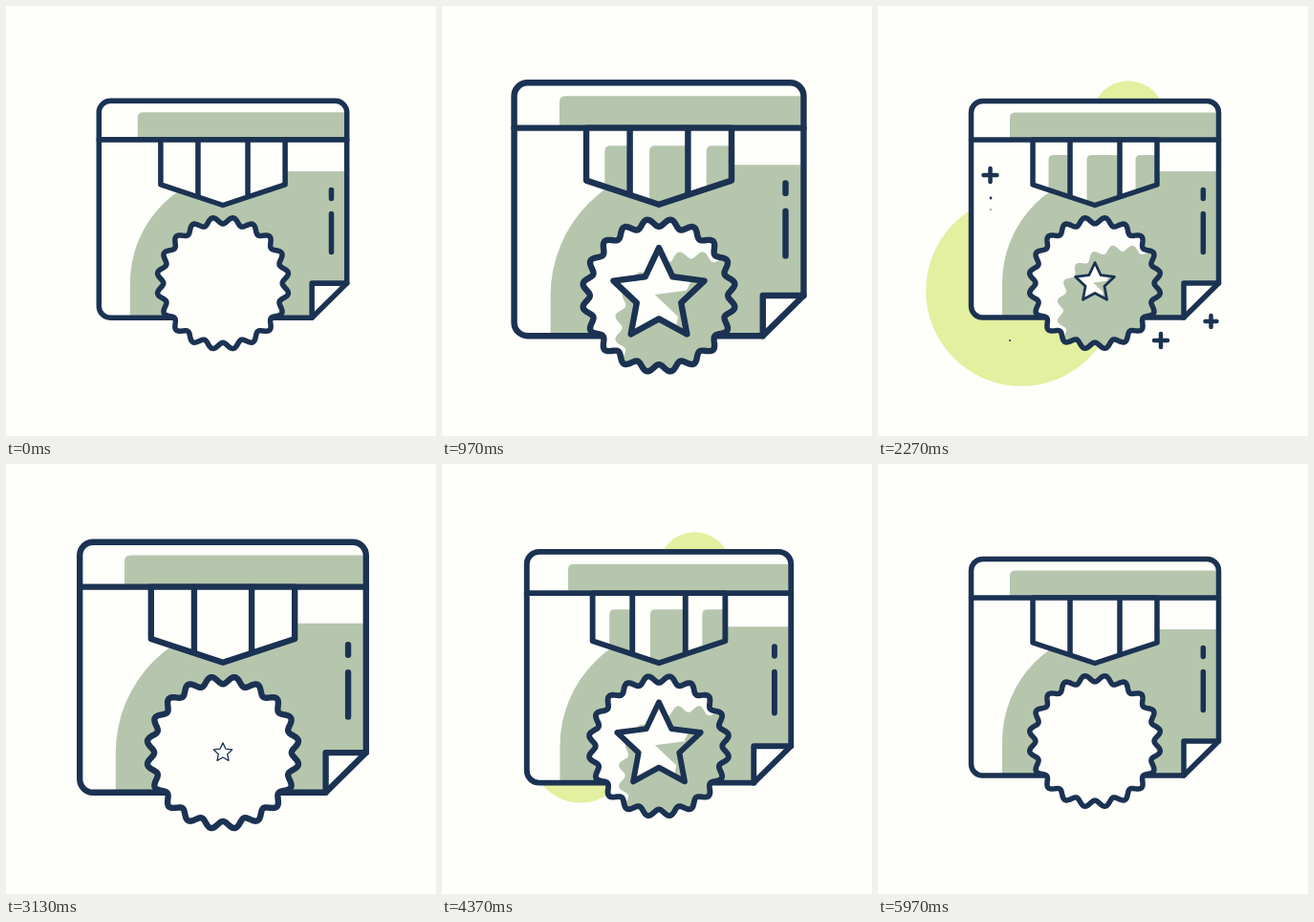
Animation, 450 px wide and 450 px high, one loop 6.01 s. Source, as an HTML page:

```html
<!DOCTYPE html>
<html lang="en">
<head>
<meta charset="utf-8">
<title>Award badge</title>
<style>
  html, body { margin: 0; width: 100%; height: 100%; overflow: hidden; background: #fefefa; }
  svg { display: block; width: 100vw; height: 100vh; }
  .line { fill: none; stroke: #1b3252; stroke-width: 5.5; stroke-linecap: round; stroke-linejoin: round; }
  .paper { fill: #fefefa; }
  .shade { fill: #b5c6ad; }
  .glow { fill: #e2f0a0; }
  .ink { fill: #1b3252; }
  .spark { stroke-width: 4.5; }
</style>
</head>
<body>
<svg viewBox="0 0 450 450">
  <defs>
    <path id="badgeShape"/>
    <path id="starShape"/>
    <path id="pageShape" d="M320 326H109.500A12 12 0 0 1 97.500 314V111.500A12 12 0 0 1 109.500 99.500H344.500A12 12 0 0 1 356.500 111.500V290Z"/>
    <path id="ribbonShape" d="M162 140V187L227 208.500L292 187V140Z"/>
    <clipPath id="badgeClip"><use href="#badgeShape"/></clipPath>
    <clipPath id="starClip"><use href="#starShape"/></clipPath>
    <clipPath id="ribbonClip"><use href="#ribbonShape"/></clipPath>
  </defs>
  <g id="scene">
    <circle id="glowRight" class="glow" cx="317" cy="226"/>
    <circle id="glowTop" class="glow" cx="262" cy="116"/>
    <circle id="glowLeft" class="glow" cx="150" cy="298"/>

    <use href="#pageShape" class="paper"/>
    <path class="shade" d="M138 140V117Q138 111.500 143.500 111.500H354V140Z"/>
    <path class="shade" d="M130 324V290A117 117 0 0 1 247 173H354V290L320 324Z"/>
    <path class="paper" d="M320 326V290H356.500Z"/>
    <use href="#pageShape" class="line"/>
    <path class="line" d="M320 326V290H356.500M97.500 140H356.500"/>
    <path id="dashes" class="line" d="M340.300 192.500V201.500M340.300 217.500V257.500"/>
    <g id="dots" class="ink">
      <circle cx="287" cy="119.700"/><circle cx="311.500" cy="119.700"/><circle cx="336" cy="119.700"/>
    </g>

    <g id="medal">
      <use href="#ribbonShape" class="paper"/>
      <path id="panels" class="shade" clip-path="url(#ribbonClip)"/>
      <use href="#ribbonShape" class="line"/>
      <path class="line" d="M201 140V199M253 140V199"/>
      <g id="badge">
        <use href="#badgeShape" class="paper"/>
        <g clip-path="url(#badgeClip)"><use id="badgeShade" href="#badgeShape" class="shade"/></g>
        <use href="#badgeShape" class="line"/>
        <g id="star">
          <use href="#starShape" class="paper"/>
          <g clip-path="url(#starClip)"><use id="starShade" href="#starShape" class="shade"/></g>
          <use href="#starShape" class="line"/>
        </g>
      </g>
    </g>
    <g id="sparks">
      <path class="line spark" d="M-7 0H7M0 -7V7"/>
      <path class="line spark" d="M-7 0H7M0 -7V7"/>
      <path class="line spark" d="M-6 0H6M0 -6V6"/>
      <circle class="ink" r="1.400"/>
      <circle class="ink" r="0.700"/>
      <circle class="ink" r="1"/>
    </g>
  </g>
</svg>
<script>
const LOOP = 6010, BEAT = 3000;
const $ = id => document.getElementById(id);

// Closed outline around the origin, starting at the top
function outline(count, radius) {
  const points = Array.from({ length: count }, (_, i) => {
    const a = i / count * 2 * Math.PI, r = radius(a, i);
    return (r * Math.sin(a)).toFixed(2) + ' ' + (-r * Math.cos(a)).toFixed(2);
  });
  return 'M' + points.join('L') + 'Z';
}
$('badgeShape').setAttribute('d', outline(400, a => 65.6 - 3.5 * Math.cos(20 * a)));
$('starShape').setAttribute('d', outline(10, (a, i) => i % 2 ? 21 : 43));

// Easing
const ramp = (t, from, to) => Math.min(1, Math.max(0, (t - from) / (to - from)));
const smooth = x => x * x * (3 - 2 * x);
const backOut = x => 1 + 2.7 * (x - 1) ** 3 + 1.7 * (x - 1) ** 2;
const hold = (t, in0, in1, out0, out1, ease = smooth) =>
  ease(ramp(t, in0, in1)) * (1 - smooth(ramp(t, out0, out1)));
const hump = (x, width) => Math.abs(x) < width ? Math.cos(Math.PI * x / 2 / width) ** 2 : 0;
const wobble = x => -Math.sin(Math.PI * x / 430) * hump(x, 430);

const stripes = [[178.5, 201], [218.5, 253], [269.5, 292]];
const panel = (left, right, drop) => {
  const x = Math.min(left + drop / 2, right - 5), y = 156 + drop;
  return `M${x} 230V${y + 5}q0 -5 5 -5H${right}V230Z`;
};
const sparks = [[117.5, 177], [296, 350], [348.5, 330], [118, 201], [118, 213], [138, 350]];

const place = (el, transform) => el.setAttribute('transform', transform);
const scaleAt = (x, y, s) => `translate(${x} ${y}) scale(${s}) translate(${-x} ${-y})`;
const show = (el, size) => el.style.display = size > .01 ? '' : 'none';

function draw(t) {
  const u = t < BEAT ? t : t - BEAT;

  place($('scene'), scaleAt(227, 213, 1 + .2 * hold(u, 0, 560, 700, 1800, backOut)));
  place($('medal'), scaleAt(227, 140, 1 + .11 * wobble(u - 570)));
  place($('badge'), `translate(227 290) scale(${1 + .16 * wobble(u - 615)})`);
  place($('dashes'), `translate(0 ${-8.5 * hump(u - 690, 480)})`);

  const star = hold(u, 0, 450, 1940, 2600);
  show($('star'), star);
  place($('star'), `scale(${star})`);

  const badgeShift = 105 - 76 * hold(u, 300, 670, 2350, 2850);
  const starShift = 80 - 43 * hold(u, 200, 1000, 2700, 3000);
  place($('badgeShade'), `translate(${badgeShift} ${badgeShift})`);
  place($('starShade'), `translate(${starShift} ${starShift / 3})`);

  const drop = 62 * (1 - hold(u, 350, 680, 2350, 2850));
  $('panels').setAttribute('d', stripes.map(([l, r]) => panel(l, r, drop)).join(''));

  [...$('dots').children].forEach((el, i) => el.setAttribute('r', 4.2 * hump(u - 475 - 130 * i, 240)));
  [...$('sparks').children].forEach((el, i) => {
    const k = hump(u - 2270, 420);
    show(el, k);
    place(el, `translate(${sparks[i]}) scale(${k})`);
  });

  // The glows differ between the two beats
  $('glowRight').setAttribute('r', 69.5 * hump(t - 1270, 620));
  $('glowTop').setAttribute('r', 57 * hump(t - 1860, 1040) + 39 * hump(t - 4250, 650));
  $('glowLeft').setAttribute('r', 102 * hump(t - 2350, 850) + 86 * hump(t - 4800, 920));
}

const start = performance.now();
function tick() {
  draw((performance.now() - start) % LOOP);
  requestAnimationFrame(tick);
}
tick();
</script>
</body>
</html>
```
